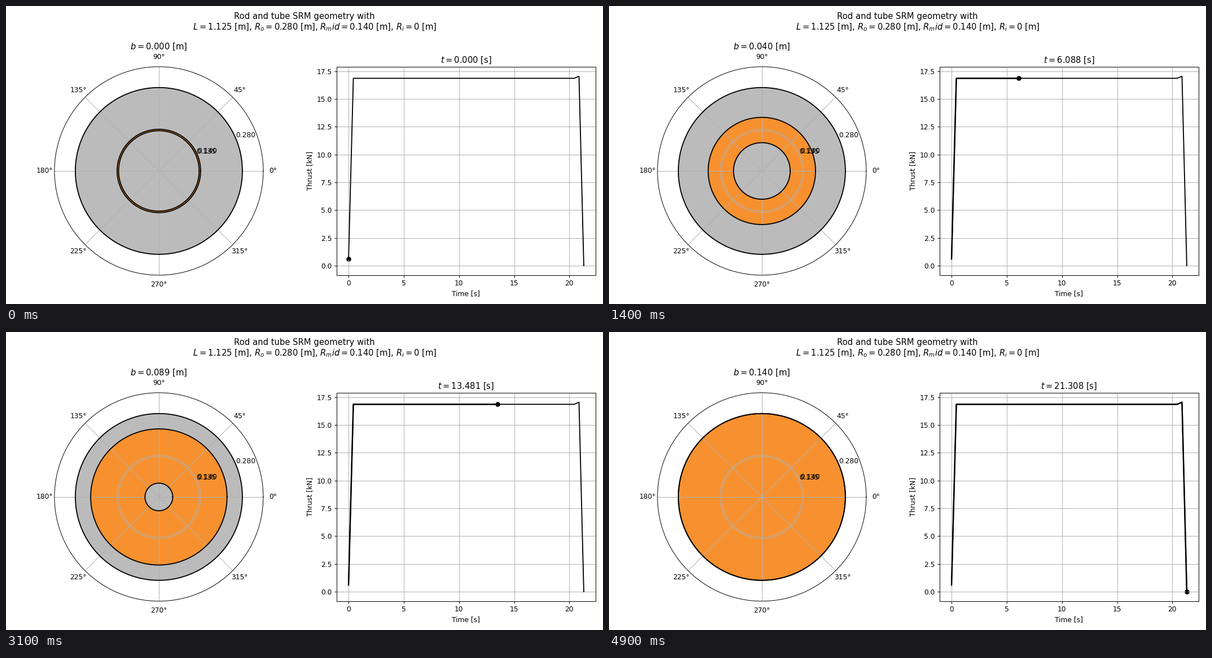
A matplotlib script for the animation above (5000 ms loop, 1058x529 px).

```python
import numpy as np
import matplotlib.pyplot as plt
from matplotlib.animation import FuncAnimation

W, H = 1058, 529
DPI = W / 12
FRAMES, INTERVAL = 50, 100

R_OUT, R_MID, R_ROD = 0.280, 0.140, 0.135
T_END, WEB = 21.308, 0.140
GRAY, ORANGE = "#bbbbbb", "#f7912f"

plt.rcParams["font.family"] = "DejaVu Sans"

time = np.linspace(0, T_END, FRAMES)
burn = np.linspace(0, WEB, FRAMES)
thrust = np.full(FRAMES, 16.86)
thrust[0], thrust[-2], thrust[-1] = 0.6, 17.05, 0.0

fig = plt.figure(figsize=(12, 6), dpi=DPI, facecolor="white")
fig.suptitle(
    "Rod and tube SRM geometry with\n" + " " * 8 +
    "$L=1.125$ [m], $R_o=0.280$ [m], $R_mid=0.140$ [m], $R_i=0$ [m]"
)


def px_axes(left, top, width, height, **kw):
    """Axes placed in pixels from the top left corner."""
    return fig.add_axes(
        [left / W, (H - top - height) / H, width / W, height / H], **kw)


# Cross-section of the grain
polar = px_axes(85.9, 107.8, 370, 370, projection="polar")
theta = np.linspace(0, 2 * np.pi, 361)


def disc(radius, color):
    r = np.full_like(theta, radius)
    fill, = polar.fill(theta, r, color=color, lw=0)
    edge, = polar.plot(theta, r, color="black", lw=1.5)
    return fill, edge


def resize(parts, radius):
    fill, edge = parts
    r = np.full_like(theta, max(radius, 0))
    fill.set_xy(np.column_stack([theta, r]))
    edge.set_data(theta, r)
    for part in parts:
        part.set_visible(radius > 0)


disc(R_OUT, GRAY)
tube = disc(R_MID, ORANGE)
rod = disc(R_ROD, GRAY)
polar.set_ylim(0, 0.35)
polar.set_yticks([R_ROD, R_MID, R_OUT], ["0.135", "0.140", "0.280"])
polar_title = polar.set_title("$b=0.000$ [m]")

# Thrust curve
chart = px_axes(586.2, 107.8, 458.6, 370)
chart.plot(time, thrust, color="black", lw=1.5)
trace, = chart.plot([], [], color="black", lw=2)
dot = chart.scatter([time[0]], [thrust[0]], color="black")
chart.set_xlim(-0.05 * T_END, 1.05 * T_END)
chart.set_ylim(-0.05 * thrust.max(), 1.05 * thrust.max())
chart.set_xlabel("Time [s]")
chart.set_ylabel("Thrust [kN]")
chart.grid(True)
chart_title = chart.set_title("$t=0.000$ [s]")


def update(i):
    resize(tube, R_MID + burn[i])
    resize(rod, R_ROD - burn[i])
    polar_title.set_text(f"$b={burn[i]:.3f}$ [m]")
    trace.set_data(time[:i + 1], thrust[:i + 1])
    dot.set_offsets([(time[i], thrust[i])])
    chart_title.set_text(f"$t={time[i]:.3f}$ [s]")
    return ()


anim = FuncAnimation(fig, update, frames=FRAMES, interval=INTERVAL,
                     init_func=lambda: update(0), repeat=True, blit=False)
plt.show()
```
